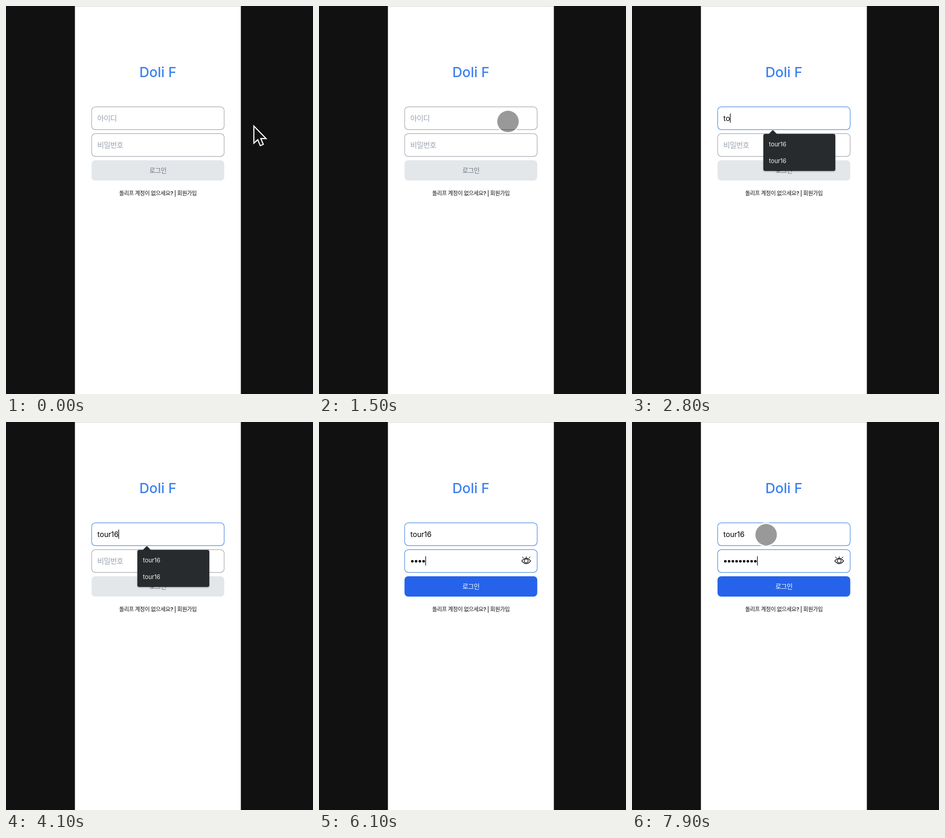
Write an HTML page that moves like this. It is 666x840 px and loops after 8 s.

```html
<!DOCTYPE html>
<html lang="ko">
<meta charset="utf-8">
<title>로그인</title>
<style>
  html, body { margin: 0; width: 100%; height: 100%; overflow: hidden; background: #111; }
  svg { display: block; width: 666px; height: 840px; font-family: Inter, "Noto Sans CJK KR", "Noto Sans CJK", sans-serif; }
  .field { fill: #fff; stroke: #a3a3ae; stroke-width: 1.2; }
  .field.filled { stroke: #4386e2; }
  .hint { font-size: 16px; letter-spacing: -.045em; fill: #9ca3af; }
  .middle { text-anchor: middle; }
  #title { font-size: 30px; font-weight: 500; fill: #3d82f0; }
  #label { font-size: 14px; letter-spacing: -.04em; }
  #signup { font-size: 12px; font-weight: 500; letter-spacing: -.04em; fill: #111; }
  #idText { font-size: 16px; letter-spacing: -.01em; }
  #rows { font-size: 13px; fill: #f1f1f1; }
  #list { filter: drop-shadow(0 1.5px 1.5px rgba(0, 0, 0, .4)); }
  #eye { fill: none; stroke: #111; stroke-width: 1.5; stroke-linecap: round; }
</style>
<svg viewBox="0 0 666 840">
  <rect width="666" height="840" fill="#111"/>
  <rect x="149.5" width="360" height="840" fill="#fff"/>
  <rect x="149.5" width="360" height="1" fill="#ccc"/>
  <text id="title" class="middle" x="329.5" y="153.5">Doli F</text>

  <rect id="idField" class="field" x="185.8" y="218.4" width="287.5" height="49.2" rx="8"/>
  <text id="idHint" class="hint" x="198" y="248.5">아이디</text>
  <text id="idText" x="198.3" y="248.7"></text>

  <rect id="pwField" class="field" x="185.8" y="276.4" width="287.5" height="49.2" rx="8"/>
  <text id="pwHint" class="hint" x="198" y="306.5">비밀번호</text>
  <g id="dots"></g>
  <g id="eye">
    <path d="M440 301Q449.5 288.5 459 301Q449.5 312.5 440 301Z"/>
    <circle cx="449.5" cy="300.6" r="4.2"/>
    <path d="M449.5 291V293.3M441.3 292.2L443.4 294.4M457.7 292.2L455.6 294.4" stroke-width="1.2"/>
  </g>
  <rect id="caret" width="1.3" height="20"/>

  <rect id="button" x="185.5" y="334" width="288" height="44" rx="8"/>
  <text id="label" class="middle" x="329.5" y="361">로그인</text>
  <text id="signup" class="middle" x="329.5" y="409.8">돌리프 계정이 없으세요? | 회원가입</text>

  <g id="list">
    <path d="M296.5 277.5L304 269.7Q305.5 268.3 307 269.7L314.5 277.5Z" fill="#282b2e"/>
    <rect id="panel" x="285" y="277" width="156" rx="4" fill="#282b2e"/>
    <g id="rows"></g>
  </g>

  <path id="arrow" d="M0 0V37L8.5 29.5L14 42.5L20.5 39.5L15 27H26.5Z" transform="translate(537.5 260)"
        fill="#111" stroke="#fff" stroke-width="2.4"/>
  <g id="touch">
    <circle r="25" fill="none" stroke="#fff" stroke-opacity=".75" stroke-width="3"/>
    <circle r="23.4" fill="#000" fill-opacity=".4" stroke="#fff" stroke-opacity=".3"/>
  </g>
</svg>
<script>
  const LOOP = 8000, STEP = 100;
  const USER = "tour16";
  const HISTORY = [USER, "zxc", "letter", "zxczxc", "ccz", "zxcz"];
  const MATCHES = [USER, USER];
  const ID_KEYS = [2600, 2800, 3200, 3600, 4000, 4100];
  const PW_KEYS = [5200, 5300, 5600, 6100, 6400, 6500, 7000, 7200, 7500];
  const DOT_PITCH = 8.14;

  const $ = id => document.getElementById(id);
  const show = (id, on) => $(id).style.display = on ? "" : "none";
  const clamp = v => Math.min(1, Math.max(0, v));
  const mix = (a, b, u) => a + (b - a) * u;
  const mixColor = (a, b, u) => `rgb(${a.map((v, i) => Math.round(mix(v, b[i], u)))})`;
  const bezier = (a, b, c, d, u) =>
    a * (1 - u) ** 3 + 3 * b * u * (1 - u) ** 2 + 3 * c * u * u * (1 - u) + d * u ** 3;
  const pressed = (keys, t) => keys.filter(k => k <= t).length;

  function pointer(t) {
    if (t < 1600) {
      const s = clamp((t - 500) / 900), u = s * s * (3 - 2 * s);
      return [bezier(537, 500, 425, 410, u), bezier(258, 203, 203, 250, u)];
    }
    if (t >= 7700) {
      const u = clamp((t - 7700) / 200);
      return [mix(406, 291, u), mix(252, 244, u)];
    }
    return null;
  }

  function drawPointer(t) {
    const p = pointer(t), outside = p && p[0] > 509;
    show("arrow", outside);
    show("touch", p && !outside);
    if (!p) return;
    $("arrow").setAttribute("transform", `translate(${p[0] + .7} ${p[1] + 2})`);
    $("touch").setAttribute("transform", `translate(${p})`);
  }

  function drawList(t) {
    const open = t >= 1600 && t < 4400;
    show("list", open);
    if (!open) return;
    const items = t < 2600 ? HISTORY : MATCHES;
    $("list").style.opacity = t < 1700 ? .5 : 1;
    $("panel").setAttribute("height", 8 + 36 * items.length);
    $("rows").innerHTML = items.map((s, i) => `<text x="297" y="${304 + 36 * i}">${s}</text>`).join("");
  }

  function drawForm(t) {
    const typed = pressed(ID_KEYS, t), hidden = pressed(PW_KEYS, t);
    $("idText").textContent = USER.slice(0, typed);
    $("idField").classList.toggle("filled", typed > 0);
    $("pwField").classList.toggle("filled", hidden > 0);
    show("idHint", !typed);
    show("pwHint", !hidden);
    show("eye", hidden);
    $("dots").innerHTML = Array.from({ length: hidden }, (_, i) =>
      `<circle cx="${202.5 + DOT_PITCH * i}" cy="301.5" r="2.8"/>`).join("");

    const onPassword = t >= 4400;
    const textWidth = typed ? $("idText").getComputedTextLength() : 0;
    show("caret", t >= 1600);
    $("caret").setAttribute("x", 198.2 + (onPassword ? DOT_PITCH * hidden : textWidth));
    $("caret").setAttribute("y", onPassword ? 290.7 : 232.8);

    const active = clamp((t - 5200) / 200);
    $("button").setAttribute("fill", mixColor([228, 231, 234], [37, 99, 235], active));
    $("label").setAttribute("fill", mixColor([107, 114, 128], [255, 255, 255], active));
  }

  function frame() {
    const t = Math.floor(performance.now() % LOOP / STEP) * STEP;
    drawForm(t);
    drawList(t);
    drawPointer(t);
    requestAnimationFrame(frame);
  }
  frame();
</script>
</html>
```
